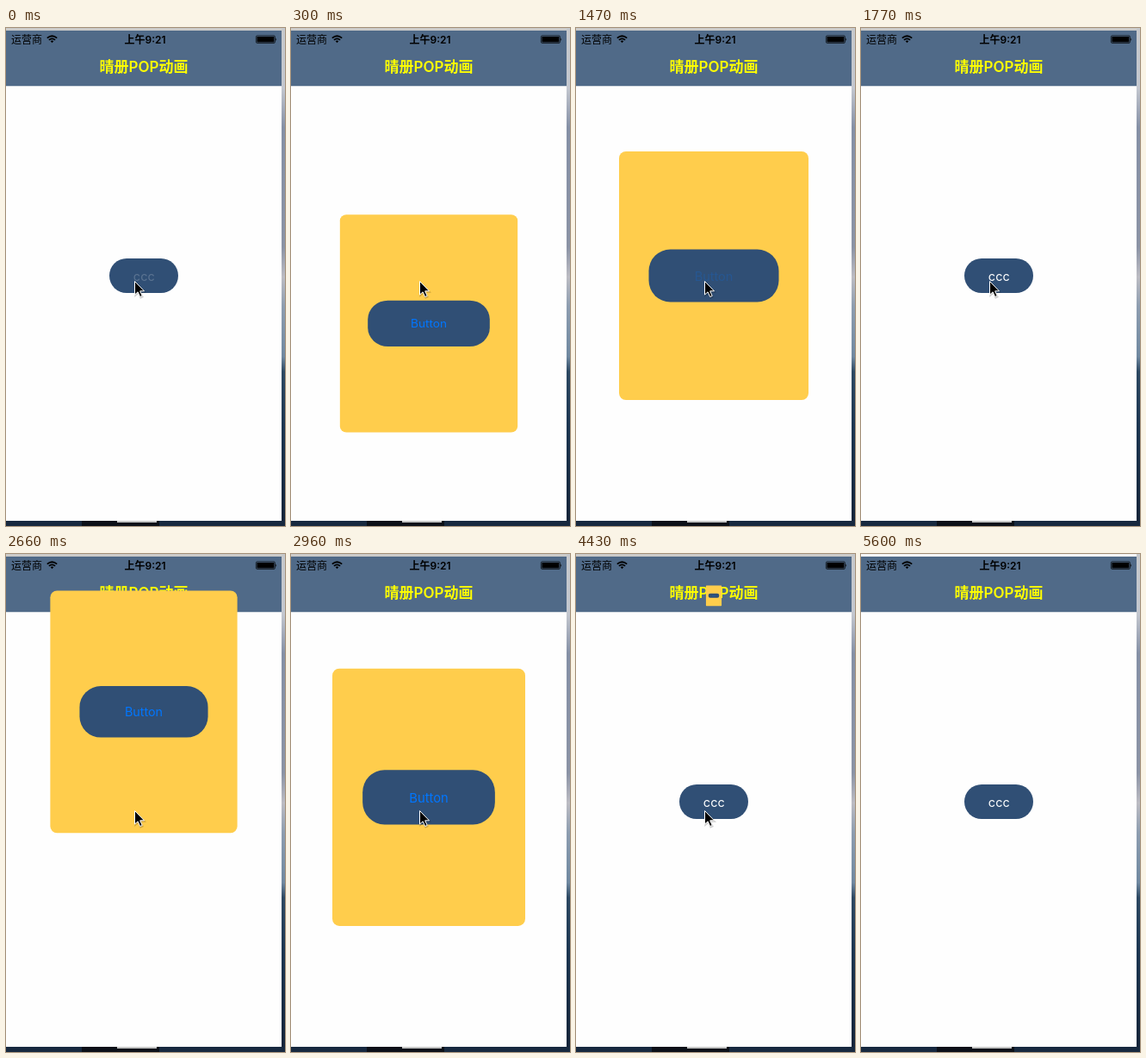
Animation, 324 px wide and 577 px high, one loop 5640 ms. Source, as an HTML page:

```html
<!DOCTYPE html>
<html lang="zh">
<head>
<meta charset="utf-8">
<style>
html, body { margin: 0; width: 100%; height: 100%; overflow: hidden; }
svg { display: block; width: 324px; height: 577px; }
text { font-family: Inter, "Noto Sans CJK SC", sans-serif; }
.mid { text-anchor: middle; }
.label { font-size: 14.5px; text-anchor: middle; }
</style>
</head>
<body>
<svg viewBox="0 0 324 577">
  <defs>
    <linearGradient id="sky" x1="0" y1="0" x2="0" y2="1">
      <stop offset="0" stop-color="#c6c8cb"/>
      <stop offset=".12" stop-color="#c3c7cf"/>
      <stop offset=".2" stop-color="#8590a6"/>
      <stop offset=".44" stop-color="#8b93a5"/>
      <stop offset=".5" stop-color="#bcbcc3"/>
      <stop offset=".56" stop-color="#8d9db0"/>
      <stop offset=".66" stop-color="#6f88a0"/>
      <stop offset=".69" stop-color="#2c4862"/>
      <stop offset=".8" stop-color="#1b3550"/>
      <stop offset="1" stop-color="#142338"/>
    </linearGradient>
    <clipPath id="screen"><rect y="3" width="320" height="568"/></clipPath>
  </defs>

  <rect width="324" height="577" fill="url(#sky)"/>
  <rect y="571" width="324" height="6" fill="#17293f"/>
  <rect x="88" y="571" width="90" height="6" fill="#0c1018"/>
  <rect x="129" y="571" width="46" height="2" fill="#c4c4c4"/>
  <rect id="top" width="320" height="3"/>

  <g clip-path="url(#screen)">
    <rect y="3" width="320" height="568" fill="#fefefe"/>
    <rect y="3" width="320" height="64" fill="#506a88"/>
    <rect y="67" width="320" height=".5" fill="#a9b4c2"/>
    <text class="mid" x="160" y="51" font-size="17" font-weight="600" fill="#ff0">晴册POP动画</text>
    <rect x="120" y="267" width="80" height="40" rx="20" fill="#304f75"/>
    <text id="open" class="label" x="160.3" y="292.5" fill="#fff">ccc</text>

    <g id="card">
      <rect x="-110" y="-144" width="220" height="288" rx="8" fill="#ffcd4c"/>
      <rect x="-75.5" y="-30.5" width="151" height="61" rx="25" fill="#304f75"/>
      <text id="close" class="label" y="5.5" fill="#0076ff">Button</text>
    </g>

    <text x="6" y="17.5" font-size="12">运营商</text>
    <g fill="none" stroke="#000" stroke-width="1.7">
      <path d="M47.8 11.6Q53.5 6.9 59.2 11.6M49.9 13.8Q53.5 10.9 57.1 13.8"/>
      <path d="M51.6 15L53.5 17.2L55.4 15Q53.5 13.8 51.6 15Z" fill="#000" stroke="none"/>
    </g>
    <text class="mid" x="161.5" y="17.5" font-size="12" font-weight="600">上午9:21</text>
    <rect x="290.4" y="8.9" width="22" height="8.6" rx="1.4" fill="none" stroke="#000" stroke-width=".7"/>
    <rect x="291.4" y="9.9" width="20" height="6.6" rx=".6"/>
    <path d="M313.4 11.4Q315 13.2 313.4 15Z"/>
  </g>

  <g id="cursor">
    <path d="M0 0V15.5L3.6 12.3L6.2 18L8.7 16.9L6.2 11.3H11Z" transform="translate(.6 1.2)"
      fill="#000" stroke="#000" stroke-width="1.6" opacity=".18"/>
    <path d="M0 0V15.5L3.6 12.3L6.2 18L8.7 16.9L6.2 11.3H11Z" fill="#000" stroke="#fff" stroke-width="1"/>
  </g>
</svg>
<script>
const LOOP = 5640, STEPS = 38, STEP = 5600 / STEPS;
const REST = 287, AWAY = -281, CLOSE_TIME = 0.386;
const [top_, open_, card, close_, cursor] =
  ['top', 'open', 'card', 'close', 'cursor'].map(id => document.getElementById(id));

// Remaining distance, 1 to 0, of a spring with unit mass.
function spring(t, friction, tension = 342.1) {
  const d = friction / 2, w = Math.sqrt(tension - d * d);
  return Math.exp(-d * t) * (Math.cos(w * t) + d / w * Math.sin(w * t));
}
const slide = t => spring(t, 22.02);
const wobble = t => spring(t, 11.09);

// cubic-bezier(.25, .1, .25, 1)
function ease(x) {
  if (x >= 1) return 1;
  let lo = 0, hi = 1, s;
  for (let i = 0; i < 24; i++) {
    s = (lo + hi) / 2;
    if (0.75 * s * (1 - s) + s ** 3 < x) lo = s; else hi = s;
  }
  return 0.3 * s * (1 - s) ** 2 + 3 * s * s * (1 - s) + s ** 3;
}

// Times in ms at which the card starts to open and to close.
const visits = [[83, 1572], [2540, 4322.5]];

function placeCard(ms) {
  const visit = visits.find(([a, b]) => ms >= a && ms < b + 1000 * CLOSE_TIME);
  card.style.display = visit ? '' : 'none';
  if (!visit) return;
  const [a, b] = visit;
  let y, sx, sy;
  if (ms < b) {
    const t = (ms - a) / 1000, u = wobble(t);
    y = REST + (AWAY - REST) * slide(t);
    sx = 1 + 0.2 * u;
    sy = 1 + 0.4 * u;
  } else {
    const t = (ms - b) / 1000;
    y = REST + (AWAY - REST) * ease(t / CLOSE_TIME);
    sx = sy = wobble(t);
  }
  card.setAttribute('transform', `translate(160 ${y}) scale(${sx} ${sy})`);
}

function placeCursor(k) {
  let x = 149.5, y = k < 13 ? 293.5 : k < 14 ? 295.5 : 297.5;
  if (k === 32) [x, y] = [190, 375];
  if (k === 33) [x, y] = [271, 519];
  cursor.style.display = k < 34 ? '' : 'none';
  cursor.setAttribute('transform', `translate(${x} ${y})`);
}

function draw(now) {
  // The screen is refreshed in coarse steps.
  const k = Math.floor((now % LOOP + 9) / STEP);
  placeCard(k * STEP);
  placeCursor(k);
  open_.setAttribute('opacity', k === 0 || k === 16 || k === 17 ? 0.2 : 1);
  close_.setAttribute('opacity', k === 10 || k === 11 || k === 28 || k === 29 ? 0.2 : 1);
  top_.setAttribute('fill', k < STEPS ? '#cbcbc9' : '#f6f6f6');
  requestAnimationFrame(draw);
}
draw(performance.now());
</script>
</body>
</html>
```
